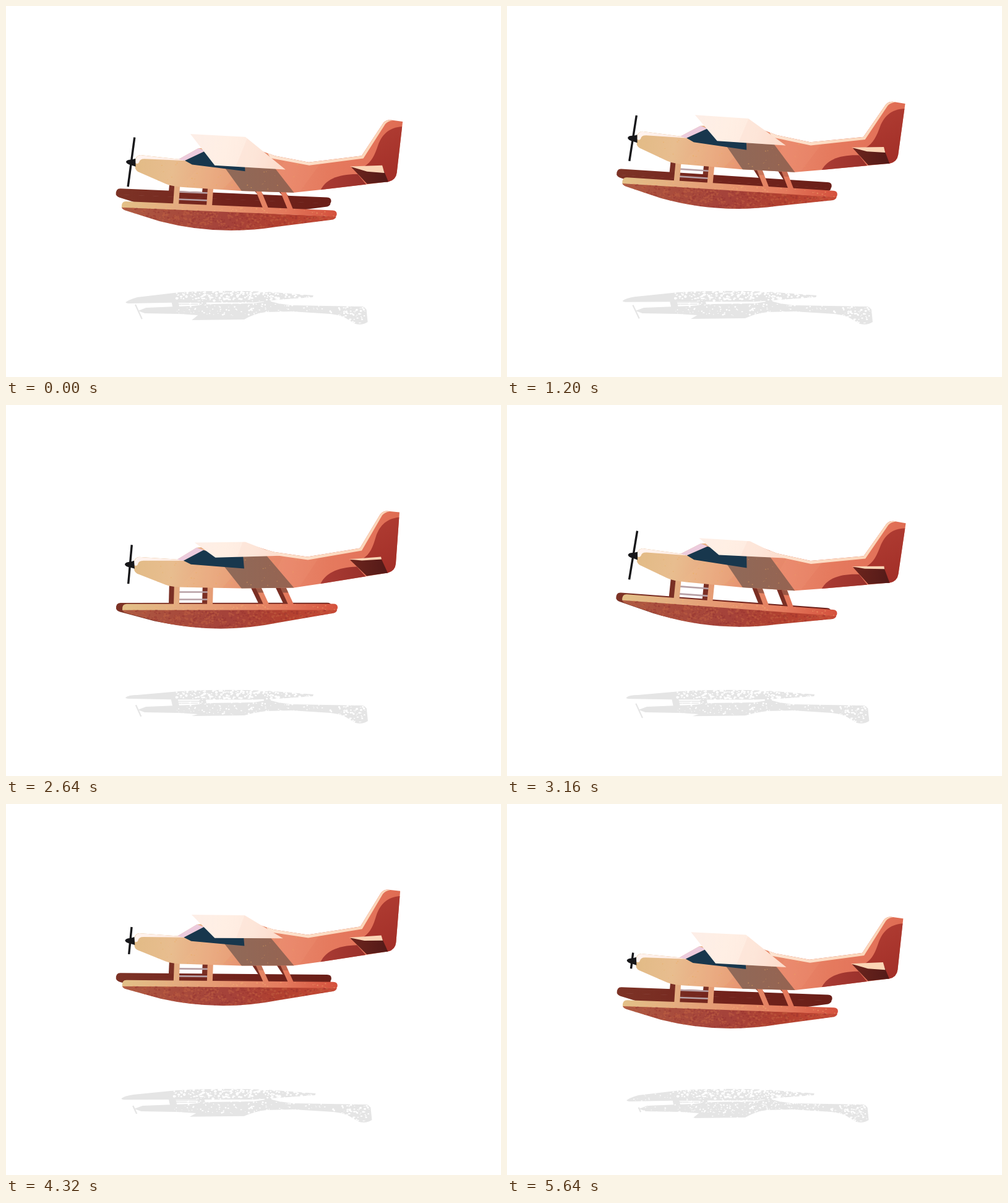
Animation of 800 by 600 pixels, one loop 5680 ms. Source, as an HTML page with a canvas:

```html
<!DOCTYPE html>
<html lang="en">
<head>
<meta charset="utf-8">
<title>Seaplane</title>
<style>
html, body { margin: 0; width: 100%; height: 100%; overflow: hidden; background: #fff; }
canvas { display: block; }
</style>
</head>
<body>
<canvas id="stage" width="800" height="600"></canvas>
<script>
const LOOP = 5680, STEP = 40, TAU = Math.PI * 2;
const PIVOT = { x: 365, y: 299 };
const ctx = document.getElementById('stage').getContext('2d');
const shade = document.createElement('canvas');
shade.width = 800;
shade.height = 600;
const sctx = shade.getContext('2d');

const lerp = (a, b, k) => a + (b - a) * k;

// Every motion is a wave that closes over the loop.
function pose(t) {
  const w = TAU * t / LOOP;
  return {
    rise: 16.2 - 18.6 * Math.cos(2 * w),
    pitch: (1.7 + 4.16 * Math.sin(2 * w + 0.09) + 0.48 * Math.sin(w + 0.89)) * Math.PI / 180,
    roll: 0.5 + 0.5 * Math.cos(w),
    blade: Math.abs(Math.cos(23.5 * w - 0.21)),
    wear: Math.max(0, (t / LOOP - 0.95) * 20)
  };
}

function random(seed) {
  return () => {
    seed = (seed * 1664525 + 1013904223) >>> 0;
    return seed / 4294967296;
  };
}

function specks(seed, count, x, y, w, h, size) {
  const rnd = random(seed), path = new Path2D();
  for (let i = 0; i < count; i++) {
    const cx = x + rnd() * w, cy = y + rnd() * h;
    const rx = size * (0.35 + rnd() * 0.65), ry = rx * (0.5 + rnd() * 0.5);
    path.moveTo(cx + rx, cy);
    path.ellipse(cx, cy, rx, ry, 0, 0, TAU);
  }
  return path;
}

function ramp(x0, y0, x1, y1, ...stops) {
  const g = ctx.createLinearGradient(x0, y0, x1, y1);
  stops.forEach((c, i) => g.addColorStop(i / (stops.length - 1), c));
  return g;
}

const poly = (...pts) => new Path2D('M' + pts.map(p => p.join(' ')).join('L') + 'Z');
const fill = (path, colour) => { ctx.fillStyle = colour; ctx.fill(path); };

function within(path, draw) {
  ctx.save();
  ctx.clip(path);
  draw();
  ctx.restore();
}

const shape = {
  body: new Path2D('M207 253Q208 246 215 245L277 249L308 230L387 223L432 237L487 245L572 231L605 176Q609 171 616 171L636 173L630 256Q629 268 617 271L512 288L465 295L380 296L290 294Q268 294 258 290L212 272Q207 269 207 264Z'),
  cowl: new Path2D('M207 255Q208 246 215 245L277 249L290 251L222 251Q214 251 213 257Q211 261 207 258Z'),
  screen: poly([277, 249], [308, 230], [320, 234], [287, 251]),
  glass: poly([287, 251], [319, 234], [345, 240], [383, 242], [385, 264], [299, 257]),
  cast: poly([338, 242], [421, 243], [467, 297], [383, 299]),
  fin: new Path2D('M637 181C612 183 603 198 598 212C593 229 589 240 577 248L617 274L634 268Z'),
  belly: new Path2D('M507 292C514 272 535 262 567 261L584 280Z'),
  back: new Path2D('M420 233L432 237L487 245L572 231L605 176Q609 171 616 171L620 171.5Q612 173 608 178L575 235L488 250L425 241Z'),
  elevator: poly([556, 250], [606, 247], [617, 271], [583, 276]),
  deck: new Path2D('M195 321L529 321Q536 321 536 327Q536 330 534 331L188 331Q187 321 195 321Z'),
  hull: new Path2D('M188 330.5L535 330.5Q535 334 530 336L440 351.5Q345 371 250 350.5L194 335.5Q189 334 188 330.5Z'),
  cone: new Path2D('M192 257Q193 253 201 253L207 251L208 264L201 262Q193 261 192 257Z')
};

const paint = {
  body: ramp(207, 250, 640, 310, '#e2bb86', '#e8bd8f', '#e9a880', '#e68f6d', '#e8866a', '#e57a5e', '#e3735a', '#dc684e'),
  cowl: ramp(207, 0, 290, 0, '#fff4f0', '#fdebe2'),
  cast: ramp(350, 0, 465, 0, '#8f6a59', '#966351'),
  fin: ramp(580, 190, 630, 270, '#b03d33', '#a22e27'),
  belly: ramp(510, 0, 585, 0, '#a93b34', '#99302a'),
  back: ramp(425, 0, 620, 0, '#fde3d0', '#fbd3b5'),
  elevator: ramp(560, 0, 615, 0, '#6b241d', '#541a18'),
  deck: ramp(188, 0, 536, 0, '#e3c188', '#e4ac80', '#e6946f', '#e47a5d', '#d4503c'),
  hull: ramp(188, 0, 536, 0, '#ae5b43', '#a84b3c', '#a5423a', '#b2402f', '#c64936'),
  rear: ramp(188, 0, 536, 0, '#7d3326', '#72231c', '#6b1f18'),
  wing: ramp(300, 215, 450, 255, '#fdeee7', '#ffefe4', '#feeadf', '#fcdccb'),
  black: '#17171a',
  shadow: '#e5e5e5'
};

const grain = {
  light: specks(7, 480, 190, 331, 345, 32, 2.3),
  dark: specks(19, 300, 190, 331, 345, 32, 2.2),
  deck: specks(31, 70, 190, 321, 345, 10, 1.5),
  gold: specks(43, 60, 235, 248, 250, 47, 1.2)
};

const holes = [
  specks(3, 250, 275, 459, 225, 18, 2.3),
  specks(23, 170, 275, 479, 290, 22, 1.7),
  specks(53, 65, 545, 486, 50, 30, 2)
];
const wearSpecks = specks(71, 520, 188, 459, 405, 56, 1.5);

// Two upright pairs of legs, then two leaning ones.
const legs = Array.from({ length: 4 }, (_, i) =>
  i < 2 ? { x: 272 + 54 * i, lean: -1 } : { x: 399 + 40 * (i - 2), lean: 17 });

const leg = ({ x, lean }, dx = 0, lift = 0) =>
  poly([x + dx, 285], [x + dx + 9, 285], [x + lean + dx + 9, 322 - lift], [x + lean + dx, 322 - lift]);

function drawFloat(rear) {
  fill(shape.hull, rear ? paint.rear : paint.hull);
  fill(shape.deck, rear ? paint.rear : paint.deck);
  if (rear) return;
  within(shape.hull, () => {
    fill(grain.light, 'rgba(198,104,68,.42)');
    fill(grain.dark, 'rgba(142,44,44,.38)');
  });
  within(shape.deck, () => fill(grain.deck, 'rgba(245,180,115,.45)'));
}

function drawGear(roll) {
  const lift = 19 * roll + 1.5;
  ctx.save();
  ctx.translate(-10, -lift);
  drawFloat(true);
  ctx.restore();
  for (const l of legs) fill(leg(l, -8, lift), '#7a2f24');
  ctx.fillStyle = '#b7a0a5';
  for (const y of [300.5, 312.5]) ctx.fillRect(279, y, 48, 2.6);
  drawFloat(false);
  for (const l of legs) {
    const path = leg(l);
    fill(path, paint.deck);
    if (l.lean > 0) within(path, () => {
      ctx.fillStyle = `rgba(130,75,60,${0.75 * (1 - roll)})`;
      ctx.fillRect(l.x, 285, 30, 18);
    });
  }
}

function drawBody(roll) {
  fill(shape.body, paint.body);
  within(shape.body, () => {
    fill(poly([330, 240], [400, 240], [345, 300], [275, 300]), 'rgba(235,190,140,.18)');
    fill(poly([450, 240], [510, 240], [470, 300], [420, 300]), 'rgba(240,150,120,.2)');
    fill(shape.cast, paint.cast);
    fill(shape.fin, paint.fin);
    fill(shape.belly, paint.belly);
    fill(grain.gold, 'rgba(236,172,92,.5)');
    fill(shape.back, paint.back);
    fill(shape.cowl, paint.cowl);
  });
  fill(shape.screen, '#eccbdd');
  fill(shape.glass, '#18374d');
  fill(shape.elevator, paint.elevator);
  fill(poly([554, 249], [606, 245], [607 + 3 * roll, 249 + 8 * roll],
    [575 + 7 * roll, 251 + 5 * roll]), '#fbd5b6');
}

function drawWing(roll) {
  const mix = (x0, y0, x1, y1) => [lerp(x0, x1, roll), lerp(y0, y1, roll)];
  const wing = poly(mix(305, 222, 294, 207.5), mix(387, 221, 383, 208.5),
    mix(444, 243, 450, 258.5), mix(338.5, 246, 335.5, 256.5));
  fill(wing, paint.wing);
  within(wing, () => fill(poly([390, 200], [450, 200], [450, 270], [365, 270]), 'rgba(250,210,190,.22)'));
}

function bar(c, x, y, dx, dy, width, colour) {
  c.strokeStyle = colour;
  c.lineWidth = width;
  c.beginPath();
  c.moveTo(x - dx, y - dy);
  c.lineTo(x + dx, y + dy);
  c.stroke();
}

function drawProp(blade) {
  bar(ctx, 200.5, 257, 3.7 * blade, -41 * blade, 3.4, paint.black);
  fill(shape.cone, paint.black);
}

function drawShadow({ rise, roll, blade, wear }) {
  const tip = 473 + 6 * roll, low = 476.5 + 3 * roll, wing = 503 + 5 * roll;
  const grow = 1 + rise * 0.00095;
  sctx.setTransform(1, 0, 0, 1, 0, 0);
  sctx.globalCompositeOperation = 'source-over';
  sctx.clearRect(0, 0, 800, 600);
  sctx.fillStyle = paint.shadow;
  sctx.setTransform(grow, 0, 0, 1, 390 * (1 - grow), 0);
  sctx.fill(new Path2D(`M193 ${tip}Q198 ${tip - 4} 212 ${469 + 2 * roll}L280 463Q345 459 420 462L497 468L496 471L440 475L400 ${low}L280 ${low}L200 ${tip + 2}Q193 ${tip + 2} 193 ${tip}Z`));
  sctx.fill(new Path2D(`M213 493L226 488L300 485L330 482L400 481L425 477L440 481L460 484L574 486Q581 486 583 491L585 511Q576 517 565 514L556 509Q545 500 525 498L462 494L420 495Q402 497 385 ${wing - 1}L300 ${wing}L310 500L280 498L224 497Z`));
  for (const x of [266, 311, 416]) sctx.fill(poly([x, 473], [x + 11, 473], [x + 14, 487], [x + 3, 487]));
  for (const y of [478.5, 481.5]) sctx.fillRect(278, y, 36, 1.4);
  bar(sctx, 214, 494.5, 5.5 * blade, 12 * blade, 2.2, paint.shadow);

  sctx.globalCompositeOperation = 'destination-out';
  for (const h of holes) sctx.fill(h);
  sctx.globalAlpha = wear;
  sctx.fill(wearSpecks);
  sctx.globalAlpha = 1;
  ctx.drawImage(shade, 0, 0);
}

function draw(t) {
  const p = pose(t);
  ctx.fillStyle = '#fff';
  ctx.fillRect(0, 0, 800, 600);
  drawShadow(p);
  ctx.save();
  ctx.translate(PIVOT.x, PIVOT.y - p.rise);
  ctx.rotate(p.pitch);
  ctx.translate(-PIVOT.x, -PIVOT.y);
  drawGear(p.roll);
  drawBody(p.roll);
  drawWing(p.roll);
  drawProp(p.blade);
  ctx.restore();
}

const start = performance.now();
function tick() {
  const t = (performance.now() - start) % LOOP;
  draw(Math.floor(t / STEP) * STEP);
  requestAnimationFrame(tick);
}
tick();
</script>
</body>
</html>
```
